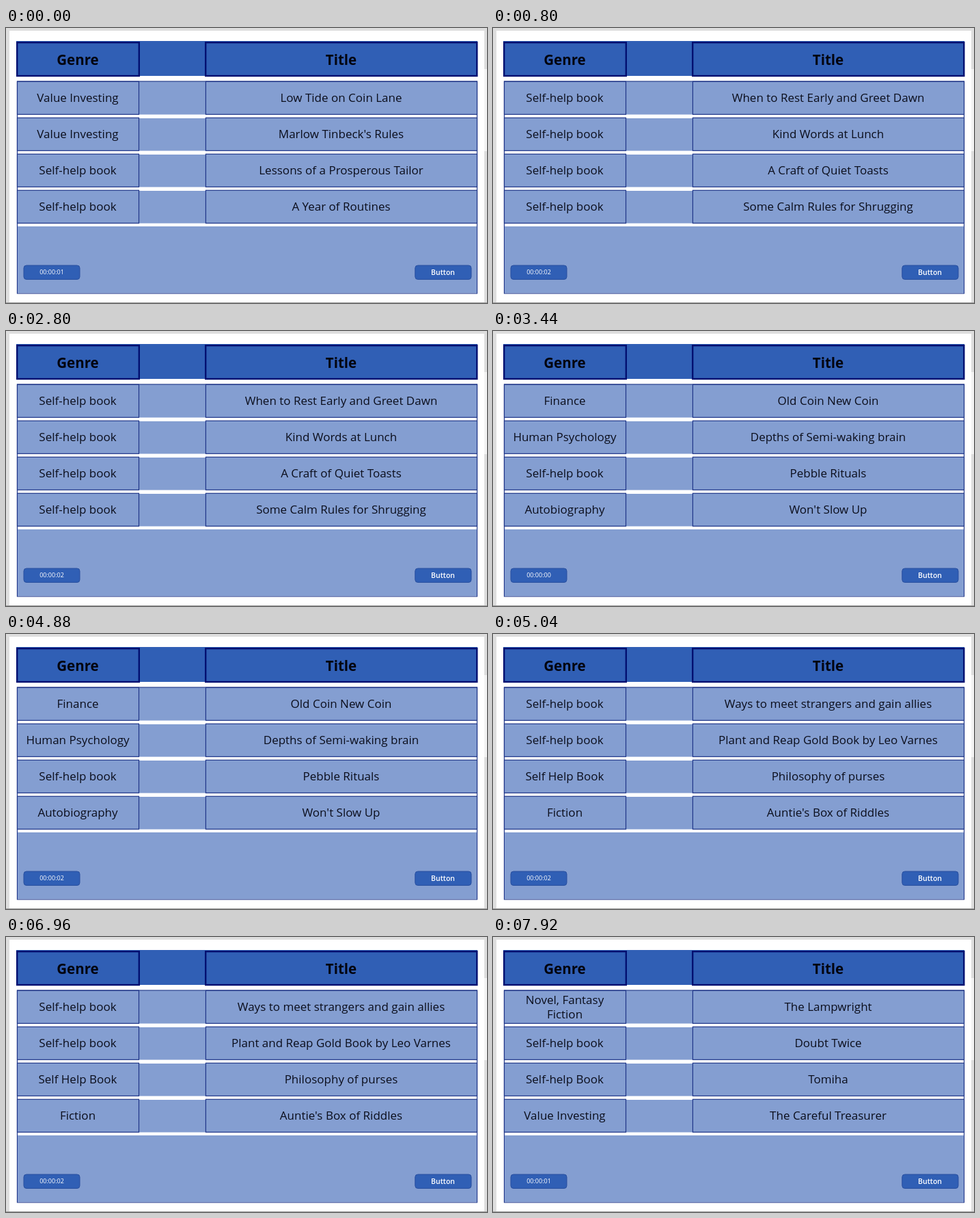
These frames come from a looping animation (704 by 402 pixels, 8 s). An HTML page:

```html
<!DOCTYPE html>
<html lang="en">
<head>
<meta charset="utf-8">
<title>Book list</title>
<style>
  html, body { margin: 0; width: 100%; height: 100%; overflow: hidden; background: #fff; }
  svg { display: block; width: 704px; height: 402px; }
  text { font-family: "Open Sans", sans-serif; text-anchor: middle; fill: #0b0e1c; }
  .cell { font-size: 17px; }
  .head { font-size: 20.5px; font-weight: 700; fill: #03040f; }
  .small { font-size: 9px; fill: #fff; }
  .label { font-size: 10.5px; font-weight: 600; fill: #fff; }
  .box { fill: #849ed1; stroke: #1f3588; stroke-width: 1.2; }
  .headBox { fill: #305fb5; stroke: #020f70; stroke-width: 2.4; }
  .button { fill: #305fb5; stroke: #284f9f; stroke-width: 1; }
</style>
</head>
<body>
<svg id="stage" viewBox="0 0 704 402"></svg>
<script>
const LOOP = 8000;
const GENRE_X = 105, TITLE_X = 490.5;
const ROW_TOP = 78, ROW_STEP = 53;

const pages = [
  { at: 0, rows: [
    ["Value Investing", "Low Tide on Coin Lane"],
    ["Value Investing", "Marlow Tinbeck's Rules"],
    ["Self-help book", "Lessons of a Prosperous Tailor"],
    ["Self-help book", "A Year of Routines"]] },
  { at: 760, rows: [
    ["Self-help book", "When to Rest Early and Greet Dawn"],
    ["Self-help book", "Kind Words at Lunch"],
    ["Self-help book", "A Craft of Quiet Toasts"],
    ["Self-help book", "Some Calm Rules for Shrugging"]] },
  { at: 2900, rows: [
    ["Finance", "Old Coin New Coin"],
    ["Human Psychology", "Depths of Semi-waking brain"],
    ["Self-help book", "Pebble Rituals"],
    ["Autobiography", "Won't Slow Up"]] },
  { at: 5040, rows: [
    ["Self-help book", "Ways to meet strangers and gain allies"],
    ["Self-help book", "Plant and Reap Gold Book by Leo Varnes"],
    ["Self Help Book", "Philosophy of purses"],
    ["Fiction", "Auntie's Box of Riddles"]] },
  { at: 7180, rows: [
    ["Novel, Fantasy|Fiction", "The Lampwright"],
    ["Self-help book", "Doubt Twice"],
    ["Self-help Book", "Tomiha"],
    ["Value Investing", "The Careful Treasurer"]] }
];

// Each entry: time in ms, seconds shown on the timer.
const ticks = [[0, 1], [320, 2], [840, 0], [1440, 1], [1720, 2], [2960, 0], [3600, 1],
  [4120, 2], [5120, 0], [5840, 1], [6400, 2], [7260, 0], [7900, 1]];

const stage = document.getElementById("stage");

function add(tag, attributes, content = "") {
  const node = document.createElementNS("http://www.w3.org/2000/svg", tag);
  for (const [name, value] of Object.entries(attributes)) node.setAttribute(name, value);
  node.textContent = content;
  return stage.appendChild(node);
}
// Rectangle given by its edges.
const rect = (left, top, right, bottom, style) =>
  add("rect", { x: left, y: top, width: right - left, height: bottom - top, ...style });
const text = (x, y, cls, content) => add("text", { x, y, class: cls }, content);

// Window edges
rect(0, 0, 704, 402, { fill: "#dedede" });
rect(5, 4, 700, 401, { fill: "#fff" });
rect(700, 60, 704, 180, { fill: "#f3f3f3" });
rect(0, 401, 704, 402, { fill: "#a0a0a0" });

// Header
rect(15, 19, 690, 70, { fill: "#305fb5" });
rect(16.2, 21.2, 194.8, 70, { class: "headBox" });
rect(292.2, 21.2, 689.3, 70, { class: "headBox" });
text(GENRE_X, 53.5, "head", "Genre");
text(TITLE_X, 53.5, "head", "Title");

// Table body
rect(16.5, 78, 689.5, 388, { class: "box", style: "fill:#fff" });
rect(17, 290, 689, 387.5, { fill: "#849ed1" });
for (let i = 0; i < 4; i++) {
  const top = ROW_TOP + i * ROW_STEP;
  rect(195, top + 1, 292, top + 48.5, { fill: "#849ed1" });
  rect(16.5, top + 0.3, 194.5, top + 48.3, { class: "box" });
  rect(292.4, top + 0.3, 689.5, top + 48.3, { class: "box" });
}
rect(195, 78, 292, 79, { fill: "#4f68a9" });

const genres = [], titles = [];
for (let i = 0; i < 4; i++) {
  const y = ROW_TOP + i * ROW_STEP + 30;
  genres.push([text(GENRE_X, y, "cell"), text(GENRE_X, y + 10.5, "cell")]);
  titles.push(text(TITLE_X, y, "cell"));
}

// Buttons
rect(26, 347, 108, 367.5, { class: "button", rx: 4 });
rect(598.8, 347, 681, 367.5, { class: "button", rx: 4 });
const timer = text(67, 360.2, "small");
text(639.5, 361.3, "label", "Button");

function showPage(page) {
  page.rows.forEach(([genre, title], i) => {
    const y = ROW_TOP + i * ROW_STEP + 30;
    const [first, second = ""] = genre.split("|");
    genres[i][0].textContent = first;
    genres[i][0].setAttribute("y", second ? y - 10 : y);
    genres[i][1].textContent = second;
    titles[i].textContent = title;
  });
}

let shown;
function draw() {
  const time = performance.now() % LOOP;
  const page = pages.findLast(p => p.at <= time);
  if (page !== shown) showPage(shown = page);
  timer.textContent = "00:00:0" + ticks.findLast(([at]) => at <= time)[1];
  requestAnimationFrame(draw);
}
draw();
</script>
</body>
</html>
```
